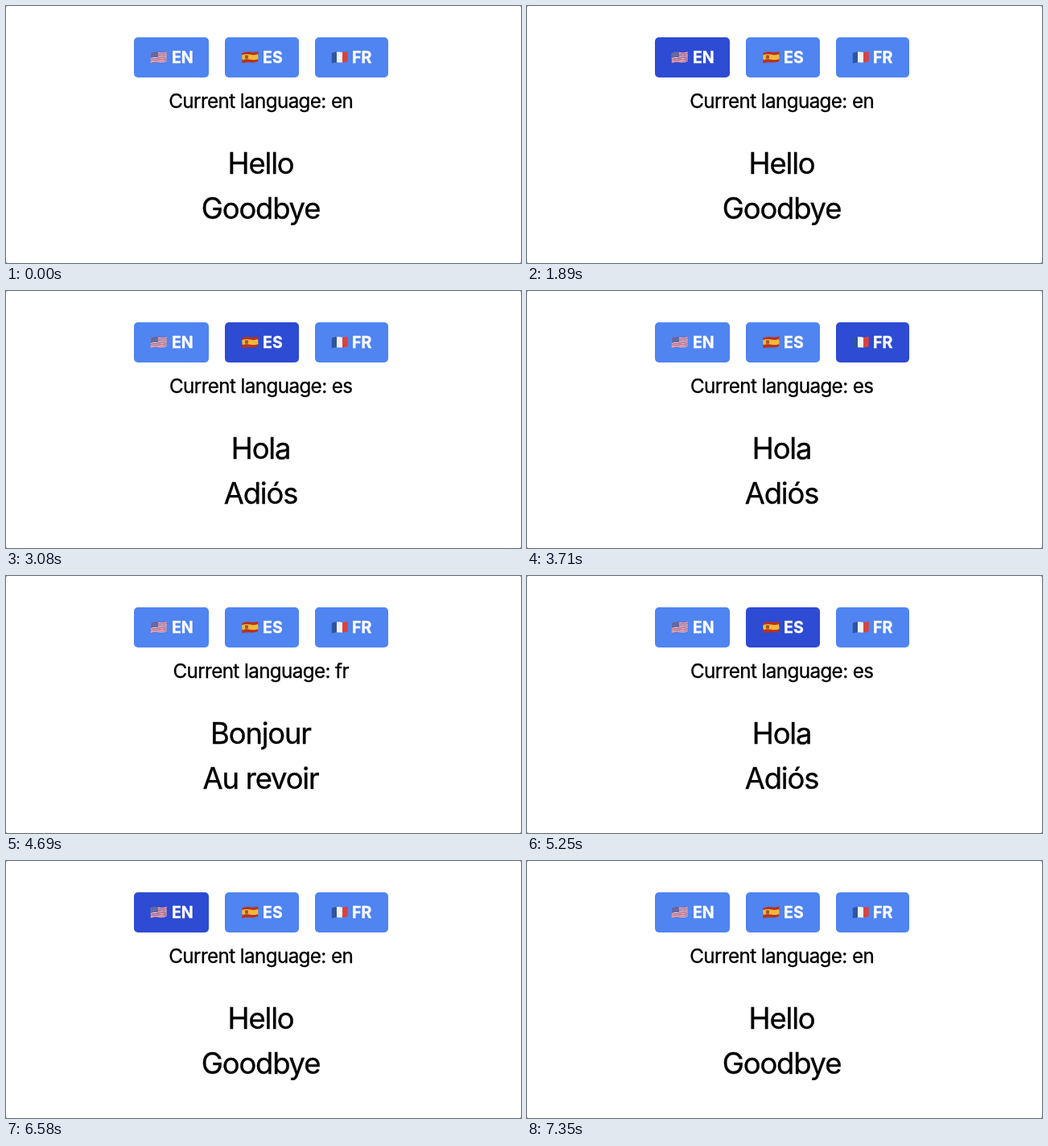
Animation, 640 px wide and 320 px high, one loop 7.98 s. Source, as an HTML page:

```html
<!DOCTYPE html>
<html lang="en">
<head>
<meta charset="utf-8">
<title>Language switcher</title>
<style>
  html, body { margin: 0; width: 100%; height: 100%; overflow: hidden; background: #fff; }
  svg { display: block; width: 640px; height: 320px; background: #777; }
  text {
    font-family: Inter, "Liberation Sans", sans-serif; font-optical-sizing: none;
    text-anchor: middle; stroke: #000; stroke-width: .35px;
  }
  .label { font-size: 19.6px; font-weight: 700; fill: #fff; stroke: #fff; text-anchor: start; }
  #current { font-size: 24.2px; letter-spacing: -.0245em; }
  #hello, #bye { font-size: 36.4px; letter-spacing: -.032em; }
</style>
</head>
<body>
<svg viewBox="0 0 640 320">
  <clipPath id="cloth"><path d="M.3 2.200Q5 0 10.300 1T20.400.2V12.800Q15.500 14.600 10.300 14T.3 15Z"/></clipPath>
  <rect width="640" height="320" rx="2" fill="#fff"/>
  <g id="buttons"></g>
  <text id="current" x="316.700" y="127"></text>
  <text id="hello" x="316.500" y="209"></text>
  <text id="bye" x="316.500" y="265"></text>
</svg>
<script>
const LOOP = 7980, IDLE = "#4f84f1", HOVER = "#2d4bd3";
const $ = id => document.getElementById(id);

const words = { en: ["Hello", "Goodbye"], es: ["Hola", "Adiós"], fr: ["Bonjour", "Au revoir"] };
const languageAt = [[0, "en"], [3080, "es"], [4130, "fr"], [5250, "es"], [6580, "en"]];
const hoverAt = [[0, ""], [1260, "en"], [2310, ""], [2380, "es"], [3640, ""], [3710, "fr"],
  [4690, ""], [4760, "es"], [5740, "en"], [6930, ""]];

// A wavy horizontal band of a flag.
const band = (y, height, color) =>
  `<path d="M0 ${y + height / 2 + 1.6}q5-2.200 10.300-1t10.700-.8" fill="none" stroke="${color}" stroke-width="${height}"/>`;
const bar = (x, color) => `<rect x="${x}" width="7" height="16" fill="${color}"/>`;

const stripes = Array.from({ length: 13 }, (_, i) => band(i * 1.08, 1.15, i % 2 ? "#e8e0e6" : "#d34a58")).join("");
const flags = {
  en: stripes + `<path d="M0 2.200Q4.500 0 9.500.9V7.500Q4.500 6.800 0 8.800Z" fill="#5560a0"/>` +
    `<path d="M1 3h8M1 5h8M1 7h8" stroke="#aeb5d5" stroke-width=".6" stroke-dasharray=".7 .9"/>`,
  es: band(-1, 5, "#b9321f") + band(3.6, 6.6, "#efb93a") + band(9.9, 6, "#b9321f") +
    `<rect x="4" y="5" width="4" height="4.500" rx="1" fill="#a5552f"/>`,
  fr: bar(0, "#2f55a0") + bar(6.7, "#f1f1f3") + bar(13.7, "#d9433f")
};

const buttons = [["en", 159, 93, 179.3, 205.9], ["es", 272, 92, 293, 319], ["fr", 384, 91, 404.3, 430]];
$("buttons").innerHTML = buttons.map(([code, x, width, flagX, textX]) => `
  <rect id="${code}" x="${x}" y="39" width="${width}" height="50" rx="5"/>
  <g transform="translate(${flagX} 56.300)"><g clip-path="url(#cloth)">${flags[code]}</g></g>
  <text class="label" x="${textX}" y="71">${code.toUpperCase()}</text>`).join("");

const valueAt = (steps, time) => steps.findLast(([start]) => start <= time)[1];

let shown;
function draw() {
  const time = performance.now() % LOOP;
  const language = valueAt(languageAt, time), hover = valueAt(hoverAt, time);
  for (const [code] of buttons) $(code).setAttribute("fill", code === hover ? HOVER : IDLE);
  if (language !== shown) {
    $("current").textContent = "Current language: " + language;
    [$("hello").textContent, $("bye").textContent] = words[language];
    shown = language;
  }
  requestAnimationFrame(draw);
}
draw();
</script>
</body>
</html>
```
